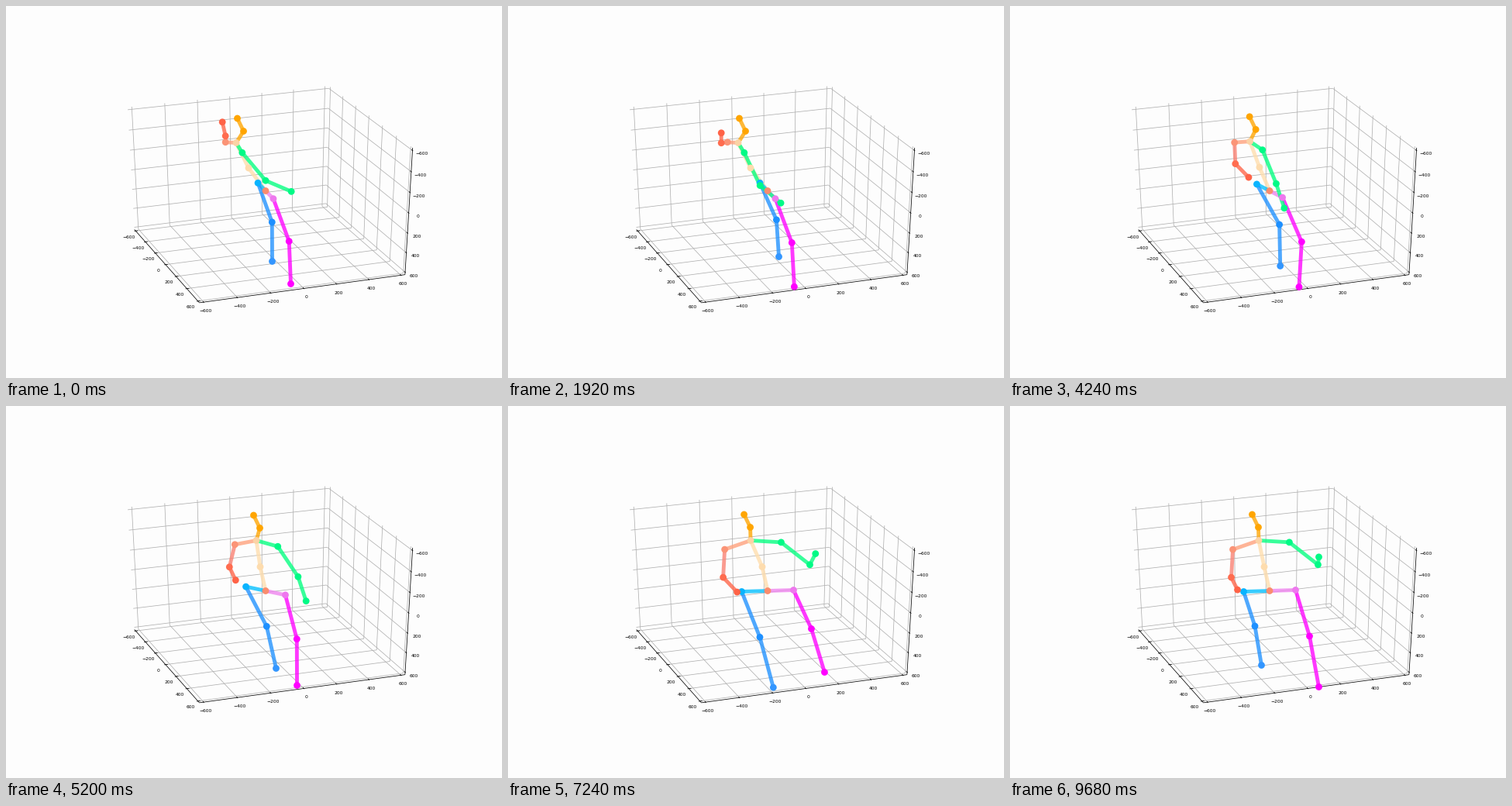
Animation of 640 by 480 pixels, one loop 9720 ms. Source, as a matplotlib script:

```python
import numpy as np
import matplotlib.pyplot as plt
from matplotlib.animation import FuncAnimation
from matplotlib.collections import LineCollection

FRAMES, STEP = 243, 40
TICKS = range(-600, 601, 200)
EDGE = 625

fig = plt.figure(figsize=(6.4, 4.8), dpi=100, facecolor="#fdfdfd")
ax = fig.add_axes([0, 0, 1, 1])
ax.set(xlim=(-0.5, 639.5), ylim=(479.5, -0.5))
ax.axis("off")


# --- the box: perspective camera, elevation 30, azimuth -20, z pointing down
def project(x, y, z):
    x, y, z = x / 1200, y / 1200, -z / 1200
    sa, ca = np.sin(np.radians(20)), np.cos(np.radians(20))
    se, ce = 0.5, np.sqrt(0.75)
    near = ca * x - sa * y
    depth = 10 - ce * near - se * z
    right = sa * x + ca * y
    up = ce * z - se * near
    return 335.2 + 2681 * right / depth, 238 - 1781 * up / depth


def lines3d(pairs, color, zorder):
    segs = [[project(*a), project(*b)] for a, b in pairs]
    ax.add_collection(LineCollection(segs, colors=color, linewidths=0.55,
                                     zorder=zorder))


def label(point, shift, value):
    px, py = project(*point)
    ax.text(px + shift[0], py + shift[1], str(value).replace("-", "\u2212"),
            fontsize=4.3, family="DejaVu Sans", ha="center", va="center")


def draw_box():
    e = EDGE
    grid, marks = [], []
    for t in TICKS:
        grid += [((t, -e, e), (t, e, e)), ((t, e, e), (t, e, -e)),
                 ((-e, t, e), (e, t, e)), ((-e, t, e), (-e, t, -e)),
                 ((-e, -e, t), (-e, e, t)), ((-e, e, t), (e, e, t))]
        marks += [((t, -e - 8, e), (t, -e + 14, e)),
                  ((e - 14, t, e), (e + 8, t, e)),
                  ((e - 14, e, t), (e + 8, e, t))]
        label((t, -e, e), (-9, 8), t)
        label((e, t, e), (3, 11.5), t)
        label((e, e, t), (11.7, 4.5), t)
    axes = [((-e, -e, e), (e, -e, e)), ((e, -e, e), (e, e, e)),
            ((e, e, e), (e, e, -e))]
    lines3d(grid, "#b0b0b0", 1)
    lines3d(axes + marks, "black", 2)


# --- motion helpers, all evaluated for every frame at once
time = np.arange(FRAMES) * STEP / 1000


def smooth(u):
    return u * u * (3 - 2 * u)


def ease(start, end):
    return smooth(np.clip((time - start) / (end - start), 0, 1))


def vec(x, y):
    return np.stack(np.broadcast_arrays(x, y, time)[:2], axis=-1)


def mix(a, b, k):
    return vec(a[0] + (b[0] - a[0]) * k, a[1] + (b[1] - a[1]) * k)


def polar(length, degrees):
    a = np.radians(degrees)
    return vec(length * np.cos(a), length * np.sin(a))


def keyed(*keys):
    """Ease from key to key; each key is (seconds, value, ...)."""
    moments, *columns = zip(*keys)
    index = np.arange(len(keys))
    pos = np.interp(time, moments, index)
    pos = np.floor(pos) + smooth(pos % 1)
    return [np.interp(pos, index, c) for c in columns]


# --- the figure: it leans sideways, then turns to face the viewer
turn = ease(3.0, 7.4)
rise = ease(3.0, 5.2)
heading = np.radians(17 + 63 * turn)


def girdle(width, height, phase):
    """Half the line across hips or shoulders, on a tilted ellipse."""
    return vec(width * np.sin(heading),
               height * np.cos(heading + np.radians(phase)))


hip = vec(334.5, 238)
spine = hip + mix((-22, -29.5), (-7, -31), rise)
sway = vec(5 * rise * np.cos(2 * np.pi * (time - 5.2) / 3.9), 0)
thorax = hip + mix((-38, -62), (-17, -65), rise) + sway
neck = thorax + mix((9.5, -15), (-0.5, -17), turn)
head = neck + vec(-8, -16.5)

# knees bulge forward of the middle of each leg, most during the turn
bend = vec(9 - 6 * turn + 7 * np.exp(-(time - 3.9) ** 2), -3 * turn)
hips = girdle(34, 12, 15)
r_hip, l_hip = hip - hips, hip + hips
r_ankle = vec(*keyed((0, 343, 329), (1.9, 349, 323), (5.2, 348, 338),
                     (7.8, 341, 366), (9.68, 324, 334)))
l_ankle = vec(*keyed((0, 367, 358), (3.3, 370, 364), (5.2, 375, 360),
                     (7.2, 408, 343), (8.5, 388, 351), (9.68, 398, 362)))
r_knee = (r_hip + r_ankle) / 2 + bend
l_knee = (l_hip + l_ankle) / 2 + bend

shoulders = girdle(37, 11, 35)
chest = thorax + mix((-3, 6), (3, 7), turn)
r_shoulder, l_shoulder = chest - shoulders, chest + shoulders

# left arm swings by angle
l_elbow = l_shoulder + polar(47, *keyed((0, 50), (3.3, 73), (7.2, 38)))
l_wrist = l_elbow + polar(
    *keyed((0, 36), (5.2, 33), (7.3, 16), (9.68, 10)),
    *keyed((0, 23), (5, 75), (7.2, -63), (8.5, -28), (9.68, -84)))

# right arm drops from beside the head
r_elbow = r_shoulder + vec(*keyed((0, 0, -8), (1.9, -8, 1), (3.3, 9, 26),
                                  (5.2, -7, 29), (7.2, -2, 36)))
r_wrist = r_elbow + vec(*keyed((0, -4, -18), (1.9, 0, -13), (3.3, 26, 18),
                               (5.2, 8, 17), (7.2, 18, 19), (8.5, 8, 16)))

# each chain: joints, bone colours, dot colours (the first joint has its own)
CHAINS = [
    ([hip, spine, thorax, neck, head],
     ["navajowhite", "navajowhite", "orange", "orange"],
     ["#fddcae", "#fbd3a6", "orange", "orange"]),
    ([hip, r_hip, r_knee, r_ankle],
     ["deepskyblue", "dodgerblue", "dodgerblue"],
     ["#08b4ff", "#1e90ff", "#3396ff"]),
    ([hip, l_hip, l_knee, l_ankle],
     ["violet", "magenta", "magenta"],
     ["#ee78ee", "magenta", "magenta"]),
    ([thorax, l_shoulder, l_elbow, l_wrist],
     ["springgreen"] * 3, ["#00fa86"] * 3),
    ([thorax, r_shoulder, r_elbow, r_wrist],
     ["lightsalmon", "salmon", "tomato"],
     ["#fb9477", "#ff6c4f", "#ff6347"]),
]
bone_ends = [pair for pts, _, _ in CHAINS for pair in zip(pts, pts[1:])]
bone_colors = [c for _, colors, _ in CHAINS for c in colors]
joints = [hip] + [p for pts, _, _ in CHAINS for p in pts[1:]]
dot_colors = ["#fa8c6e"] + [c for _, _, colors in CHAINS for c in colors]

draw_box()
bones = LineCollection([], colors=bone_colors, linewidths=3.5, alpha=0.78,
                       capstyle="projecting", zorder=4)
ax.add_collection(bones)
dots = ax.scatter(*np.array([j[0] for j in joints]).T, s=40, c=dot_colors,
                  linewidths=0, zorder=5)


def update(n):
    bones.set_segments([[a[n], b[n]] for a, b in bone_ends])
    dots.set_offsets([j[n] for j in joints])
    return bones, dots


anim = FuncAnimation(fig, update, frames=FRAMES, interval=STEP, repeat=True,
                     repeat_delay=0, blit=False)
plt.show()
```
